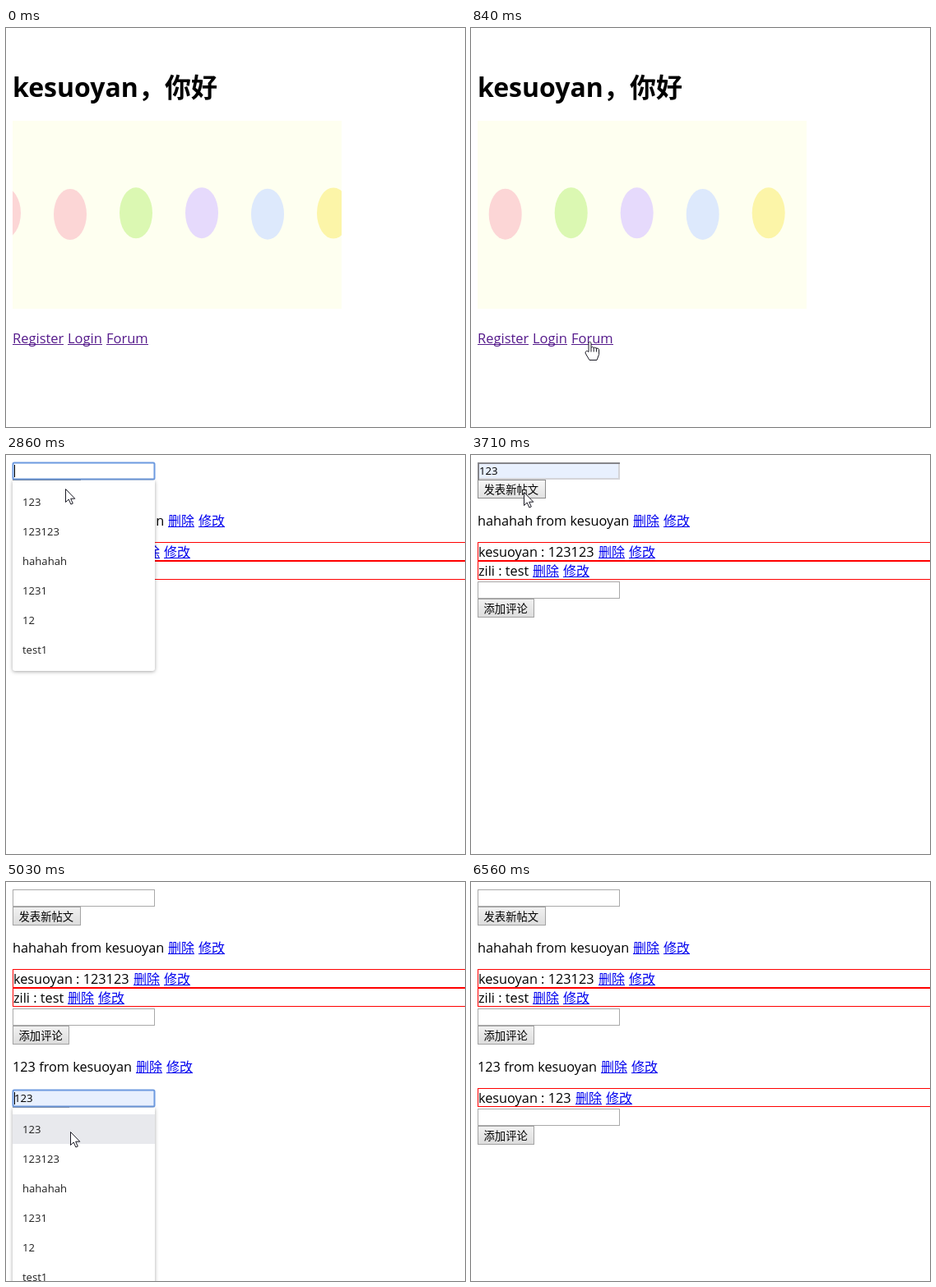
Recreate the animation shown at these times as an HTML page with a canvas. Size 558 by 486 pixels, loop 6.96 s.

```html
<!DOCTYPE html>
<html lang="zh-CN">
<head>
<meta charset="utf-8">
<title>Message board</title>
<style>
html, body { margin: 0; width: 100%; height: 100%; overflow: hidden; background: #fff; }
canvas { display: block; }
</style>
</head>
<body>
<canvas id="stage" width="558" height="486"></canvas>
<script>
const W = 558, H = 486, LOOP = 6960, TICKS = 90;
const ctx = document.getElementById('stage').getContext('2d');
const FAMILY = '"Open Sans", "Noto Sans CJK SC", "Noto Sans CJK", sans-serif';
const LEFT = 8, GAP = 5, FIELD_W = 173, ROW = 23, HINT_H = 36;
const USER = 'kesuoyan', FRIEND = 'zili';
const HINTS = ['123', '123123', 'hahahah', '1231', '12', 'test1'];
const CATS = ['#fcd6d6', '#dbf8b2', '#e6dafc', '#dde9fc', '#fcf5a8'];
const INK = '#1a1a24', LINK = '#0000ee', VISITED = '#551a8b';

// Story beats, in ticks
const BEAT = {
  enter: 6, leavePage: 13, board: 14,
  focusPost: 32, pickPost: 42, pressPost: 48, posted: 50,
  focusReply: 62, pickReply: 68, pressReply: 73, replied: 74, exit: 85
};

// Pointer moves: first tick, last tick, destination
const START = { x: 400, y: 466 };
const MOVES = [
  { from: BEAT.enter, to: 11, x: 144, y: 381 },
  { from: 17, to: 20, x: 88, y: 99 },
  { from: 21, to: 31, x: 73, y: 30 },
  { from: 35, to: 39, x: 70, y: 52 },
  { from: 41, to: BEAT.pressPost, x: 64, y: 45 },
  { from: BEAT.posted, to: 60, x: 82, y: 262 },
  { from: BEAT.focusReply, to: 65, x: 78, y: 304 },
  { from: 67, to: 71, x: 62, y: 284 },
  { from: BEAT.pressReply, to: 76, x: 106, y: 316 },
  { from: 78, to: BEAT.exit, x: 466, y: 486 }
];

function pointerAt(n) {
  if (n <= BEAT.enter || n >= BEAT.exit) return null;
  let { x, y } = START;
  for (const m of MOVES) {
    const k = Math.min(1, Math.max(0, (n - m.from) / (m.to - m.from)));
    x += (m.x - x) * k;
    y += (m.y - y) * k;
  }
  return { x: Math.round(x), y: Math.round(y) };
}

const inside = (p, x, y, w, h) => p && p.x >= x && p.x < x + w && p.y >= y && p.y < y + h;

function fill(color, x, y, w, h) {
  ctx.fillStyle = color;
  ctx.fillRect(x, y, w, h);
}

function frame(color, x, y, w, h) {
  ctx.strokeStyle = color;
  ctx.lineWidth = 1;
  ctx.strokeRect(x + .5, y + .5, w - 1, h - 1);
}

// Text and link return the x at which the next word starts
function text(str, x, y, size = 16.3, color = '#000', weight = 400) {
  ctx.font = `${weight} ${size}px ${FAMILY}`;
  ctx.fillStyle = color;
  ctx.fillText(str, x, y);
  return Math.round(x + ctx.measureText(str).width + GAP);
}

function link(str, x, y, size, color) {
  const next = text(str, x, y, size, color);
  fill(color, x, y + 1, next - GAP - x, 1);
  return next;
}

function entry(str, x, y) {
  let next = text(str, x, y);
  for (const label of ['删除', '修改']) next = link(label, next, y, 16, LINK);
}

function button(label, y, pointer) {
  ctx.font = `13.33px ${FAMILY}`;
  const w = Math.round(ctx.measureText(label).width) + 16;
  const hot = inside(pointer, LEFT, y, w, ROW);
  const g = ctx.createLinearGradient(0, y, 0, y + ROW);
  g.addColorStop(0, hot ? '#f8f8f8' : '#f2f2f2');
  g.addColorStop(1, hot ? '#e0e0e0' : '#dcdcdc');
  fill(g, LEFT, y, w, ROW);
  frame(hot ? '#8c8c8c' : '#a3a3a3', LEFT, y, w, ROW);
  text(label, LEFT + 7.5, y + 17, 13.33);
}

function field(y, { focus, value, open } = {}) {
  fill(value ? '#e8f0fe' : '#fff', LEFT, y, FIELD_W, 21);
  if (focus) {
    ctx.strokeStyle = '#6d9ae0';
    ctx.lineWidth = 2;
    ctx.beginPath();
    ctx.roundRect(LEFT + .5, y + .5, FIELD_W - 1, 20, 1.5);
    ctx.stroke();
    fill('#000', open ? 10 : 33, y + 3, 1, 15);
  } else if (value) {
    fill('#d4d4d8', LEFT, y + 19, FIELD_W, 2);
    fill('#d4d4d8', LEFT + FIELD_W - 2, y, 2, 21);
    fill('#85858a', LEFT, y, FIELD_W, 2);
    fill('#85858a', LEFT, y, 2, 21);
  } else {
    frame('#a9a9a9', LEFT, y, FIELD_W, 21);
  }
  if (value) text(value, 10, y + 15, 13.2);
}

function dropdown(y, hover) {
  ctx.save();
  ctx.shadowColor = 'rgba(0,0,0,.35)';
  ctx.shadowBlur = 4;
  ctx.shadowOffsetY = 1;
  ctx.fillStyle = '#fff';
  ctx.beginPath();
  ctx.roundRect(LEFT, y, FIELD_W, HINTS.length * HINT_H + 16, [0, 0, 3, 3]);
  ctx.fill();
  ctx.restore();
  HINTS.forEach((hint, i) => {
    const top = y + 8 + i * HINT_H;
    if (inside(hover, LEFT, top, FIELD_W, HINT_H)) fill('#e8e9ed', LEFT, top, FIELD_W, HINT_H);
    text(hint, 20, top + 23, 13.1, '#222');
  });
}

// State of a field that is focused, filled from its list, then sent
function fieldState(n, y, hover, focus, pick, press, sent) {
  const open = n > focus && n < pick;
  const hinted = open && inside(hover, LEFT, y + 30, FIELD_W, HINT_H);
  const kept = n >= pick && n < sent;
  return { focus: n >= focus && n < press, open, value: hinted || kept ? HINTS[0] : '' };
}

function welcome(n) {
  text(USER, LEFT, 84, 32, '#000', 700);
  text('，你好', 161, 84, 32, '#000', 700);
  fill('#fefff0', LEFT, 113, 400, 229);
  ctx.save();
  ctx.beginPath();
  ctx.rect(LEFT, 113, 400, 229);
  ctx.clip();
  for (let i = -1; i < CATS.length; i++) {
    ctx.fillStyle = CATS[Math.max(i, 0)];
    ctx.beginPath();
    ctx.ellipse(78 + 80 * i - n * 3.3, 227 - 2 * Math.abs(Math.sin(n * .3 + i)), 20, 31, 0, 0, Math.PI * 2);
    ctx.fill();
  }
  ctx.restore();
  let x = LEFT;
  for (const label of ['Register', 'Login', 'Forum']) x = link(label, x, 384, 16.5, VISITED);
}

// Draws a message with its comments, returns the y of its reply field
function post(str, y, comments, pointer, state) {
  entry(str + ' from ' + USER, LEFT, y + 33);
  y += 53;
  for (const line of comments) {
    frame('#f00', LEFT, y, W, ROW);
    entry(line, LEFT + 1, y + 18);
    y += ROW;
  }
  y += 2;
  button('添加评论', y + 21, pointer);
  field(y, state);
  return y;
}

function board(n, pointer, hover) {
  const first = fieldState(n, 9, hover, BEAT.focusPost, BEAT.pickPost, BEAT.pressPost, BEAT.posted);
  button('发表新帖文', 30, pointer);
  field(9, first);
  post('hahahah', 53, [USER + ' : 123123', FRIEND + ' : test'], pointer);
  if (first.open) dropdown(31, hover);

  if (n < BEAT.posted) return;
  const reply = fieldState(n, 253, hover, BEAT.focusReply, BEAT.pickReply, BEAT.pressReply, BEAT.replied);
  const comments = n >= BEAT.replied ? [USER + ' : 123'] : [];
  const y = post('123', 198, comments, pointer, reply);
  if (reply.open) dropdown(y + 22, hover);
}

function paintPath() {
  ctx.closePath();
  ctx.fillStyle = '#fff';
  ctx.fill();
  ctx.strokeStyle = INK;
  ctx.lineWidth = 1;
  ctx.stroke();
}

function arrow() {
  ctx.beginPath();
  ctx.moveTo(0, 0);
  ctx.lineTo(0, 16);
  ctx.lineTo(3.7, 12.5);
  ctx.lineTo(6.4, 18.5);
  ctx.lineTo(8.8, 17.5);
  ctx.lineTo(6.2, 11.7);
  ctx.lineTo(11.3, 11.7);
  paintPath();
}

function hand() {
  ctx.beginPath();
  ctx.moveTo(-1.5, 13);
  ctx.lineTo(-1.5, 2);
  ctx.quadraticCurveTo(0, -.5, 1.5, 2);
  ctx.lineTo(1.5, 8);
  for (let i = 0; i < 3; i++) {
    const x = 1.5 + i * 3.2;
    ctx.quadraticCurveTo(x + 1.6, 5.5 + i, x + 3.2, 8 + i);
  }
  ctx.lineTo(11.1, 16);
  ctx.lineTo(8.5, 23);
  ctx.lineTo(-.5, 23);
  ctx.lineTo(-5.5, 14.5);
  ctx.quadraticCurveTo(-5, 10, -1.5, 13);
  paintPath();
  for (let i = 0; i < 3; i++) fill(INK, 1 + i * 3.2, 8, 1, 5);
}

function beam() {
  fill(INK, -.5, -7.5, 1, 15);
  for (const y of [-8.5, 7.5]) {
    fill(INK, -3.5, y, 3, 1);
    fill(INK, .5, y, 3, 1);
  }
}

function drawPointer(p, n, listOpen) {
  const onLink = n < 17 && inside(p, 123, 366, 50, 22);
  const onField = !listOpen && (inside(p, LEFT, 9, FIELD_W, 22) ||
    n >= BEAT.posted && n < BEAT.pickReply && inside(p, LEFT, 253, FIELD_W, 21));
  ctx.save();
  ctx.translate(p.x + .5, p.y + .5);
  (onLink ? hand : onField ? beam : arrow)();
  ctx.restore();
}

function draw(time) {
  const n = Math.floor(time % LOOP / LOOP * TICKS + .2);
  const pointer = pointerAt(n);
  const hover = pointerAt(n - 1);
  const listOpen = n > BEAT.focusPost && n < BEAT.pickPost;
  fill('#fff', 0, 0, W, H);
  if (n < BEAT.leavePage) welcome(n);
  else if (n >= BEAT.board) board(n, pointer, hover);
  if (pointer) drawPointer(pointer, n, listOpen);
}

const begin = performance.now();
function loop() {
  draw(performance.now() - begin);
  requestAnimationFrame(loop);
}
loop();
</script>
</body>
</html>
```
